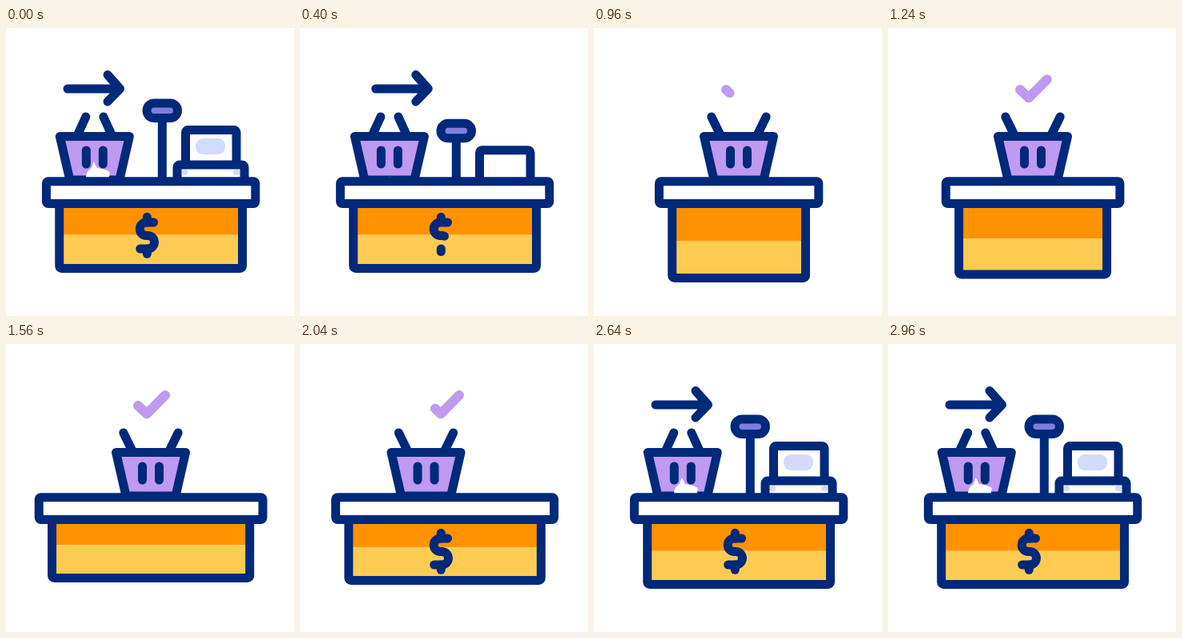
These frames come from a looping animation (360 px wide and 360 px high, 3000 ms). An HTML page:

```html
<!DOCTYPE html>
<html lang="en">
<head>
<meta charset="utf-8">
<title>Checkout counter</title>
<style>
  html, body { margin: 0; width: 100%; height: 100%; overflow: hidden; background: #fff; }
  svg { display: block; width: 100vw; height: 100vh; }
  .line { fill: none; stroke: #00297a; stroke-width: 11; stroke-linecap: round; stroke-linejoin: round; }
  .line.white { fill: #fff; }
  .line.purple { fill: #be9af0; }
  .line.glow { fill: #7f7ee0; }
  .line.mark { stroke: #be9af0; stroke-width: 12; }
</style>
</head>
<body>
<svg viewBox="0 0 360 360">
  <clipPath id="aboveCounter"><rect width="360" height="190"/></clipPath>

  <path id="arrow" class="line" d="M77 76H142M127 58.5L142.5 76L127 92"/>
  <path id="check" class="line mark" pathLength="1" d="M165 77L176 87.3L199 64"/>

  <g clip-path="url(#aboveCounter)">
    <g id="devices">
      <path class="line" d="M195.3 112V300"/>
      <rect class="line glow" x="176" y="94" width="38.5" height="18.5" rx="9.2"/>
      <rect class="line white" x="224.5" y="127.5" width="63.5" height="44" rx="3"/>
      <rect class="line white" x="214" y="171" width="84" height="40" rx="3"/>
      <g id="tint" fill="#d3dbfa">
        <rect x="237" y="138" width="37" height="20" rx="9"/>
        <rect x="220" y="177" width="7" height="7" rx="3"/>
        <rect x="284" y="177" width="8" height="7" rx="3"/>
      </g>
    </g>
  </g>

  <g id="basket">
    <path id="handles" class="line"/>
    <path class="line purple" d="M-43.5 135.5H43.5L31 190H-31Z"/>
    <path id="shine" fill="#fff" d="M-11 187Q-10 178 -4 175L-1 167L3 175Q13 176 19 180L18 187Z"/>
    <path class="line" d="M-10.5 153V170M10.5 153V170"/>
  </g>

  <rect id="orange" fill="#ff9200" y="219"/>
  <rect id="yellow" fill="#fecb52"/>
  <rect id="body" class="line" y="219" rx="3"/>
  <rect id="top" class="line white" y="191.7" height="27.8" rx="2.5"/>

  <g id="dollar" class="line">
    <path pathLength="1" d="M176.3 236.3V243"/>
    <path pathLength="1" d="M184.5 243H175.5a8.25 8.25 0 0 0 0 16.5H177.2a8.25 8.25 0 0 1 0 16.5H167.7"/>
    <path pathLength="1" d="M176.3 276V282.3"/>
  </g>
</svg>
<script>
const LOOP = 3000, CENTER = 181.1;
const el = id => document.getElementById(id);
const set = (id, attrs) => {
  for (const name in attrs) el(id).setAttribute(name, attrs[name]);
};
const mix = (a, b, p) => a + (b - a) * p;
const ease = (t, start, span = 390) => {
  const p = Math.min(1, Math.max(0, (t - start) / span));
  return (1 - Math.cos(Math.PI * p)) / 2;
};
// 0 at rest, rising to 1 after "out" and returning after "back"
const away = (t, out, back, span) => ease(t, out, span) - ease(t, back, span);

// Show only the part of a stroke between two fractions of its length
function trim(path, from, to) {
  const length = to - from;
  path.style.visibility = length > 0.005 ? 'visible' : 'hidden';
  path.setAttribute('stroke-dasharray', `${length} 3`);
  path.setAttribute('stroke-dashoffset', -from);
}

function drawCounter(t) {
  const narrow = away(t, 437, 1118);
  const wide = away(t, 1118, 1880);
  const half = 136.2 - 31 * narrow + 9.2 * wide;
  const bottom = 306 + 12 * narrow - 8 * wide;
  const split = 258.7 + 7.9 * narrow - 7.5 * wide;
  const slab = half - 5.5, box = half - 21.8;
  const x = CENTER - box, width = box * 2;
  set('top', { x: CENTER - slab, width: slab * 2 });
  set('body', { x, width, height: bottom - 224.5 });
  set('orange', { x, width, height: split - 219 });
  set('yellow', { x, width, y: split, height: bottom - 5.5 - split });
}

function drawBasket(t) {
  const x = mix(110.8, 181, away(t, 370, 1888));
  const tip = mix(11, 34.2, away(t, 485, 2150));
  set('basket', { transform: `translate(${x})` });
  set('handles', { d: `M-22.2 135.5L${-tip} 111M22.2 135.5L${tip} 111` });
  const shine = 1 - away(t, 150, 2310, 300);
  set('shine', { transform: `translate(0 187) scale(${shine}) translate(0 -187)` });
}

function drawArrow(t) {
  const x = t < LOOP / 2 ? 70 * ease(t, 270) : -70 * (1 - ease(t, 2205, 430));
  const opacity = 1 - away(t, 560, 2180, 100);
  set('arrow', { transform: `translate(${x})`, opacity });
}

function draw(t) {
  drawCounter(t);
  drawBasket(t);
  drawArrow(t);
  set('devices', { transform: `translate(0 ${100 * away(t, 270, 2150)})` });
  set('tint', { opacity: 1 - away(t, 200, 2400, 200) });
  trim(el('check'), ease(t, 1960, 370), ease(t, 870));
  const shown = 1 - away(t, 220, 1640);
  for (const part of el('dollar').children) trim(part, 0, shown);
}

const begin = performance.now();
function tick() {
  draw((performance.now() - begin) % LOOP);
  requestAnimationFrame(tick);
}
tick();
</script>
</body>
</html>
```
